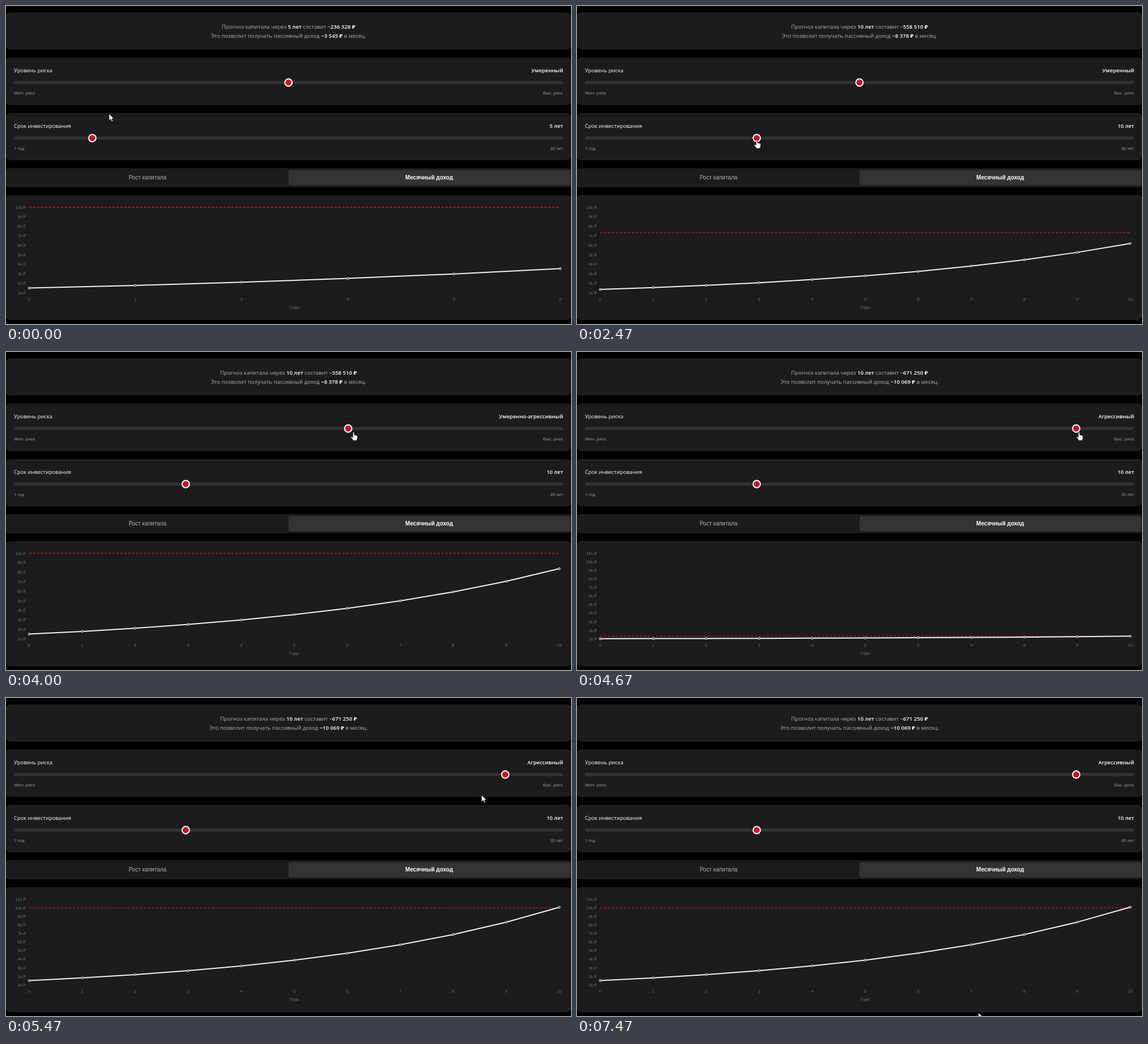
An HTML page for the animation above (7540 ms loop, 998 by 561 pixels).

```html
<!DOCTYPE html>
<html lang="ru">
<head>
<meta charset="utf-8">
<title>Прогноз капитала</title>
<style>
  html, body { margin: 0; width: 100%; height: 100%; overflow: hidden; background: #000; }
  svg { display: block; width: 998px; height: 561px; }
  text { font-family: "Open Sans", "Noto Sans", sans-serif; fill: #fff; }
  .card { fill: #1c1b1d; stroke: #272628; }
  .track { fill: #333235; }
  .info { font-size: 9.6px; fill: #b3b2b4; text-anchor: middle; }
  .info tspan { font-weight: 600; fill: #fff; }
  .label { font-size: 9.4px; font-weight: 500; }
  .value { font-size: 9.4px; font-weight: 600; text-anchor: end; }
  .hint { font-size: 7.6px; fill: #a3a2a4; }
  .end { text-anchor: end; }
  .tab { font: 10px "Liberation Sans", Arial, sans-serif; fill: #b0afb1; text-anchor: middle; }
  .on { font-weight: bold; fill: #fff; }
  .axis text { font: 7.7px "Liberation Sans", Arial, sans-serif; fill: #6c6b6d; text-anchor: middle; }
  .axis .end { text-anchor: end; }
  .thumb { fill: #c8102e; stroke: #fff; stroke-width: 2; }
  #goal { stroke: #c01b38; stroke-width: 1.3; stroke-dasharray: 4.2 2.8; }
  #line { fill: none; stroke: #f2f2f2; stroke-width: 2; stroke-linejoin: round; }
  #dots circle { fill: #4a494b; stroke: #f2f2f2; }
  .cursor { fill: #fff; stroke: #111; stroke-width: .8; stroke-linejoin: round; }
</style>
</head>
<body>
<svg viewBox="0 0 998 561">
  <rect class="card" x="-.5" y="12" width="999" height="64" rx="8"/>
  <rect class="card" x="-.5" y="91.5" width="999" height="82.5" rx="8"/>
  <rect class="card" x="-.5" y="189.5" width="999" height="82" rx="8"/>
  <rect class="card" x="-.5" y="287" width="999" height="32" rx="5"/>
  <rect class="card" x="-.5" y="334.5" width="999" height="219" rx="8"/>

  <text class="info" id="capital" x="499" y="39.8"></text>
  <text class="info" id="income" x="499" y="55.8"></text>

  <text class="label" x="14" y="117.3">Уровень риска</text>
  <text class="value" id="riskName" x="984" y="117.3"></text>
  <rect class="track" x="14" y="132.3" width="970" height="5.4" rx="2.7"/>
  <text class="hint" x="14" y="155.7">Мин. риск</text>
  <text class="hint end" x="984" y="155.7">Выс. риск</text>
  <circle class="thumb" id="riskThumb" cy="135" r="6.4"/>

  <text class="label" x="14" y="215.3">Срок инвестирования</text>
  <text class="value" id="years" x="984" y="215.3"></text>
  <rect class="track" x="14" y="230.3" width="970" height="5.4" rx="2.7"/>
  <text class="hint" x="14" y="253.5">1 год</text>
  <text class="hint end" x="984" y="253.5">30 лет</text>
  <circle class="thumb" id="yearThumb" cy="233" r="6.4"/>

  <rect class="track" x="499" y="289.5" width="497.5" height="27" rx="4"/>
  <text class="tab" x="250" y="306">Рост капитала</text>
  <text class="tab on" x="747.5" y="306">Месячный доход</text>

  <g class="axis" id="axis"></g>
  <path id="goal"/>
  <path id="line"/>
  <g id="dots"></g>

  <path class="cursor" id="arrow" d="M0 0V12.2L2.8 9.6L4.7 13.8L6.8 12.9L4.9 8.8H8.6Z"/>
  <path class="cursor" id="hand" d="M-1.3 1Q-1.3 -.4 0 -.4T1.3 1V4.6Q2.3 3.9 3.3 4.9Q4.5 4.3 5.3 5.4Q7 5 7 6.8V9.5Q7 11.5 5.8 12.5V14.2H-1.3V12.8L-4.4 8.9Q-5 7.6 -3.8 7.2Q-2.6 7.2 -1.3 8.8Z"/>
</svg>
<script>
const LOOP = 7540, TICK = 200 / 3;
const DRAG_YEARS = 800, DRAG_RISK = 3735, RISK_SET = 4620;
const LEFT = 41, TOP = 355, BASE = 506;

const el = Object.fromEntries([...document.querySelectorAll('[id]')].map(e => [e.id, e]));

// cursor stops: time, x, y
const path = [
  [0, 182, 190], [130, 182, 190], [600, 153, 234], [800, 153, 234],
  [1330, 288.5, 233], [1600, 288.5, 233], [1666, 293, 234], [1800, 293, 234],
  [2000, 317.5, 237], [2600, 317.5, 237], [3500, 508, 142], [DRAG_RISK, 508, 142],
  [4500, 890.5, 142], [RISK_SET, 890.5, 142], [4900, 840, 141], [5330, 840, 141],
  [5466, 840, 171], [6130, 868, 361], [6500, 868, 361], [6800, 948, 367],
  [7160, 948, 368], [7466, 709, 555], [LOOP, 709, 555]
];

// plans shown in the chart, each from its start time
const plans = [
  { start: -2000, years: 5, rate: 1.18767, max: 10, right: 979, capital: '236 328', income: '3 545' },
  { start: 2205, years: 10, rate: 1.18767, max: 10, right: 977.3, capital: '558 510', income: '8 378' },
  { start: 4658, years: 10, rate: 1.20974, max: 11, right: 977.3, capital: '671 250', income: '10 069' }
];

const clamp = (v, lo, hi) => Math.min(hi, Math.max(lo, v));
const smooth = p => p * p * (3 - 2 * p);
const outQuart = p => 1 - (1 - p) ** 4;
const sliderX = p => 20.5 + 957 * p;

function cursorAt(t) {
  const i = path.findIndex(k => k[0] > t);
  const [t0, x0, y0] = path[i - 1], [t1, x1, y1] = path[i];
  const p = smooth((t - t0) / (t1 - t0));
  return [x0 + (x1 - x0) * p, y0 + (y1 - y0) * p];
}

function showPlan(plan) {
  const { years, max, right, capital, income } = plan;
  el.capital.innerHTML = `Прогноз капитала через <tspan>${years} лет</tspan> составит ~<tspan>${capital} ₽</tspan>`;
  el.income.innerHTML = `Это позволит получать пассивный доход <tspan>~${income} ₽</tspan> в месяц.`;
  let labels = `<text x="${(LEFT + right) / 2}" y="534">Годы</text>`;
  for (let k = 1; k <= max; k++) {
    labels += `<text class="end" x="35" y="${valueY(plan, k) + 2.7}">${k}k ₽</text>`;
  }
  for (let n = 0; n <= years; n++) {
    labels += `<text x="${yearX(plan, n)}" y="520.2">${n}</text>`;
  }
  el.axis.innerHTML = labels;
}

const yearX = (plan, n) => LEFT + (plan.right - LEFT) * n / plan.years;
const valueY = (plan, k) => BASE - (k - 1) * (BASE - TOP) / (plan.max - 1);

function drawChart(plan, t) {
  const grow = outQuart(clamp((t - plan.start) / 1000, 0, 1));
  const y = k => BASE + (valueY(plan, k) - BASE) * grow;
  const points = Array.from({ length: plan.years + 1 },
    (_, n) => [yearX(plan, n), y(1.5 * plan.rate ** n)]);
  el.goal.setAttribute('d', `M${LEFT} ${y(10)}H${plan.right}`);
  el.line.setAttribute('d', 'M' + points.join('L'));
  el.dots.innerHTML = points.map(([x, y]) => `<circle cx="${x}" cy="${y}" r="1.8"/>`).join('');
}

let shown;
function render(time) {
  const t = Math.floor((time + 5) / TICK) * TICK % LOOP;
  const [x, y] = cursorAt(t);

  const year = t < DRAG_YEARS ? 5 : t < 2100 ? Math.round((x - 20.5) / 33) + 1 : 10;
  const risk = t < DRAG_RISK ? .5 : t < RISK_SET ? (x - 30) / 957 : .9;
  el.yearThumb.setAttribute('cx', sliderX((year - 1) / 29));
  el.riskThumb.setAttribute('cx', sliderX(risk));
  el.years.textContent = year + ' лет';
  el.riskName.textContent = risk > .8 ? 'Агрессивный' : risk > .6 ? 'Умеренно-агрессивный' : 'Умеренный';

  const plan = plans.findLast(p => t >= p.start);
  if (plan !== shown) showPlan(shown = plan);
  drawChart(plan, t);

  const pointing = (t > 480 && t < 2680) || (t > 3400 && t < 4700);
  el.hand.style.display = pointing ? '' : 'none';
  el.arrow.style.display = pointing ? 'none' : '';
  (pointing ? el.hand : el.arrow).setAttribute('transform', `translate(${x} ${y})`);
}

const begin = performance.now();
function loop() {
  render((performance.now() - begin) % LOOP);
  requestAnimationFrame(loop);
}
loop();
</script>
</body>
</html>
```
